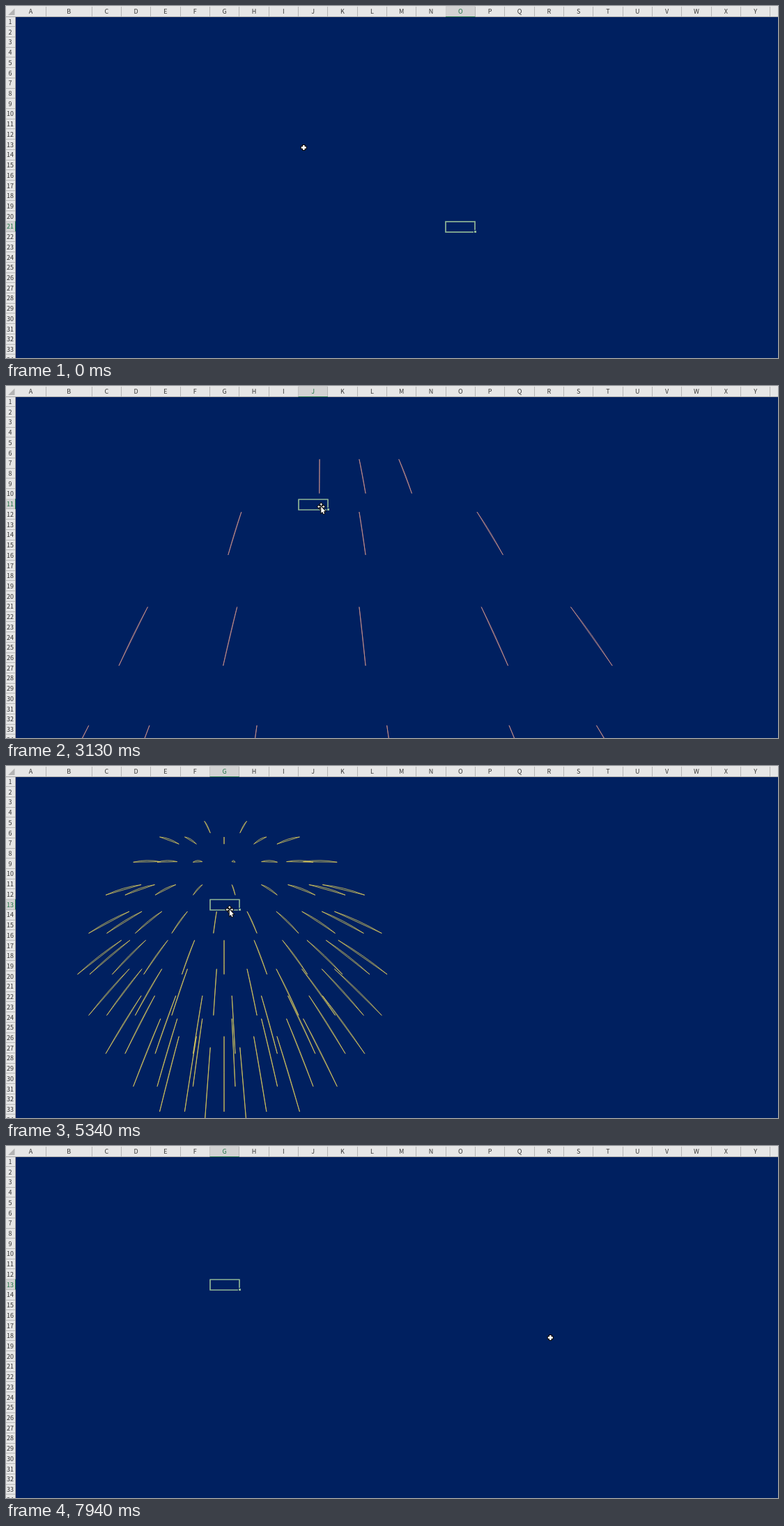
Animation, 1108 px wide and 506 px high, one loop 8000 ms. Source, as an HTML page with a canvas:

```html
<!DOCTYPE html>
<html lang="en">
<head>
<meta charset="utf-8">
<title>Spreadsheet fireworks</title>
<style>
html, body { margin: 0; width: 100%; height: 100%; overflow: hidden; background: #002060; }
canvas { display: block; width: 1108px; height: 506px; }
</style>
</head>
<body>
<canvas id="sheet" width="1108" height="506"></canvas>
<script>
const ctx = document.getElementById('sheet').getContext('2d');
const W = 1108, H = 506, LOOP = 8000;
const HEAD_H = 15, HEAD_W = 14, ROW_H = 14.72, COL_W = 42.33;
const NAVY = '#002060', GREEN = '#217346';

// Column B is wider than the others.
const colLeft = c => c === 0 ? HEAD_W : c === 1 ? 57 : 123.2 + (c - 2) * COL_W;
const rowTop = r => HEAD_H + (r - 1) * ROW_H;

const SELECTIONS = [
  { at: 0, col: 14, row: 21 },
  { at: 1690, col: 9, row: 11 },
  { at: 4140, col: 6, row: 13 }
];

// density: latitudes per half turn; progress: [time, step] key points
const BURSTS = [
  {
    x: 452, y: 175.3, gravity: 0.00203, drift: 0.14, stride: 21.8, density: 7, fewest: 4,
    color: '#cb9089',
    progress: [[1990, 1], [2480, 11], [3130, 21], [3900, 30]]
  },
  {
    x: 313, y: 203.3, gravity: 0.00185, drift: 0.07, stride: 22.8, density: 12, fewest: 3,
    color: '#dccb5c',
    progress: [[4550, 1], [4680, 3], [5340, 10], [6630, 21], [7940, 30]]
  }
];
const TRAIL = 3, LAST_STEP = 30;

// [time, x, y]
const POINTER = [
  [80, 427, 203], [550, 445, 209], [850, 445, 209], [1070, 643, 329], [1420, 392, 148],
  [1650, 452, 173], [3900, 452, 173], [4120, 313, 203], [4900, 313, 203], [5150, 320, 206],
  [5340, 320, 206], [6120, 730, 203], [7230, 730, 203], [7900, 781, 275]
];
const onCellEdge = t => (t >= 1690 && t < 3930) || (t >= 5000 && t < 5400);

const mix = (a, b, p) => a + (b - a) * p;

// Linear interpolation through keys of the form [time, ...values].
function sample(keys, t) {
  const next = keys.findIndex(key => t < key[0]);
  if (next === 0) return keys[0].slice(1);
  if (next < 0) return keys[keys.length - 1].slice(1);
  const a = keys[next - 1], b = keys[next];
  const p = (t - a[0]) / (b[0] - a[0]);
  return a.slice(1).map((v, i) => mix(v, b[i + 1], p));
}

function line(x1, y1, x2, y2, color) {
  ctx.strokeStyle = color;
  ctx.lineWidth = 1;
  ctx.beginPath();
  ctx.moveTo(x1, y1);
  ctx.lineTo(x2, y2);
  ctx.stroke();
}

function polygon(points, fill, outline) {
  ctx.beginPath();
  points.forEach(([x, y]) => ctx.lineTo(x, y));
  ctx.closePath();
  if (outline) {
    ctx.strokeStyle = outline;
    ctx.lineWidth = 2;
    ctx.lineJoin = 'miter';
    ctx.stroke();
  }
  ctx.fillStyle = fill;
  ctx.fill();
}

const crisp = v => Math.round(v) + 0.5;

function drawHeaders({ col, row }) {
  ctx.fillStyle = '#e6e6e6';
  ctx.fillRect(0, 0, W, HEAD_H);
  ctx.fillRect(0, 0, HEAD_W, H);
  ctx.textAlign = 'center';
  ctx.font = '9px "Noto Sans CJK JP", "Noto Sans CJK", "Noto Sans", sans-serif';

  for (let c = 0; c < 26; c++) {
    const x = colLeft(c), next = colLeft(c + 1), edge = crisp(next - 0.5);
    if (c === col) {
      ctx.fillStyle = '#d2d2d2';
      ctx.fillRect(x, 0, next - x, HEAD_H);
    }
    line(edge, 1, edge, HEAD_H, '#b4b4b4');
    ctx.fillStyle = c === col ? GREEN : '#333';
    if (c < 25) ctx.fillText(String.fromCharCode(65 + c), (x + next) / 2, 11.3);
  }
  for (let r = 1; r <= 34; r++) {
    const y = rowTop(r), edge = crisp(y + ROW_H - 0.5);
    if (r === row) {
      ctx.fillStyle = '#d2d2d2';
      ctx.fillRect(0, y, HEAD_W, ROW_H);
    }
    line(0, edge, HEAD_W, edge, '#b9b9b9');
    ctx.fillStyle = r === row ? GREEN : '#333';
    ctx.fillText(r, 6, y + 11);
  }
  line(0, 15.5, W, 15.5, '#a6a6a6');
  line(13.5, 16, 13.5, H, '#a6a6a6');
  line(colLeft(col), 15.5, colLeft(col + 1), 15.5, GREEN);
  line(13.5, rowTop(row), 13.5, rowTop(row + 1), GREEN);
  polygon([[3, 13], [12.5, 13], [12.5, 3.5]], '#b3b3b3');
}

function drawSelection(from, to, progress) {
  const x = Math.round(mix(colLeft(from.col), colLeft(to.col), progress));
  const y = Math.round(mix(rowTop(from.row), rowTop(to.row), progress) + 0.5);
  const w = 42, h = 15;
  ctx.strokeStyle = '#8fb596';
  ctx.lineWidth = 1.7;
  ctx.strokeRect(x, y, w, h);
  ctx.fillStyle = NAVY;
  ctx.fillRect(x + w - 2, y + h - 3, 5, 5);
  ctx.fillStyle = '#8fb596';
  ctx.fillRect(x + w - 1, y + h - 2, 3, 3);
}

// A parabola from tail to head, closed by its chord.
function traceTrail(burst, vx, vy, tail, head) {
  const { x, y, gravity } = burst;
  const at = s => [x + vx * s, y + vy * s + gravity * s * s];
  ctx.moveTo(...at(tail));
  ctx.quadraticCurveTo(x + vx * (tail + head) / 2,
    y + vy * (tail + head) / 2 + gravity * tail * head, ...at(head));
  ctx.closePath();
}

// Rings filled almost exactly by their sparks drift at the sides only.
function sideSpeed(lon, radius, drift, even) {
  const sin = Math.sin(lon), x = radius * Math.cos(lon);
  return even ? x * (1 + drift / 2 * sin) + drift * (1 - sin) : x + drift;
}

function drawBurst(burst, t) {
  if (t < burst.progress[0][0]) return;
  const step = Math.floor(sample(burst.progress, t)[0] + 0.001);
  if (step >= LAST_STEP) return;
  const { density, drift, stride } = burst;
  const head = step * stride;
  const tail = Math.max(0, step - TRAIL) * stride;
  const rings = Math.ceil(density / 2) - 1;

  ctx.beginPath();
  for (let ring = -rings; ring <= rings; ring++) {
    const lat = ring * Math.PI / density;
    const room = density * Math.cos(lat) + 1e-6;
    const count = Math.max(Math.floor(room), burst.fewest);
    const even = room % 1 < 0.2;
    const radius = Math.cos(lat) - (even ? 0 : 0.018 * Math.abs(Math.sin(lat)));
    for (let i = 1; i < count; i++) {
      const vx = sideSpeed(i * Math.PI / count, radius, drift, even);
      traceTrail(burst, vx, Math.sin(lat), tail, head);
    }
  }
  ctx.strokeStyle = burst.color;
  ctx.lineWidth = 0.8;
  ctx.lineJoin = 'round';
  ctx.stroke();
}

function quarterTurns(shape, fill) {
  for (let i = 0; i < 4; i++) {
    polygon(shape, fill, fill === '#fff' ? null : fill);
    ctx.rotate(Math.PI / 2);
  }
}

function drawPlus() {
  const arm = [[-1.3, 1.3], [-1.3, -3.5], [1.3, -3.5], [1.3, 1.3]];
  quarterTurns(arm, '#000');
  quarterTurns(arm, '#fff');
}

function drawMove() {
  const arrow = [[-0.5, 0], [-0.5, -3], [-2, -3], [0, -5.2], [2, -3], [0.5, -3], [0.5, 0]];
  quarterTurns(arrow, '#111');
  quarterTurns(arrow, '#fff');
  polygon([[0, 0], [0, 9], [2, 7.3], [3.4, 10.4], [4.8, 9.8], [3.5, 6.7], [6, 6.5]], '#fff', '#111');
}

function drawPointer(t) {
  const [x, y] = sample(POINTER, t);
  ctx.save();
  ctx.translate(x + 0.3, y + 0.5);
  onCellEdge(t) ? drawMove() : drawPlus();
  ctx.restore();
}

function draw(t) {
  ctx.fillStyle = NAVY;
  ctx.fillRect(0, 0, W, H);

  const index = SELECTIONS.findLastIndex(s => t >= s.at);
  const current = SELECTIONS[index];
  const previous = SELECTIONS[Math.max(0, index - 1)];
  const slide = Math.floor((t - current.at) / 60) + 1;
  drawSelection(previous, current, slide > 3 ? 1 : 1 - 0.4 ** slide);

  BURSTS.forEach(burst => drawBurst(burst, t));
  drawHeaders(current);
  drawPointer(t);
}

const began = performance.now();
function tick() {
  draw((performance.now() - began) % LOOP);
  requestAnimationFrame(tick);
}
tick();
</script>
</body>
</html>
```
